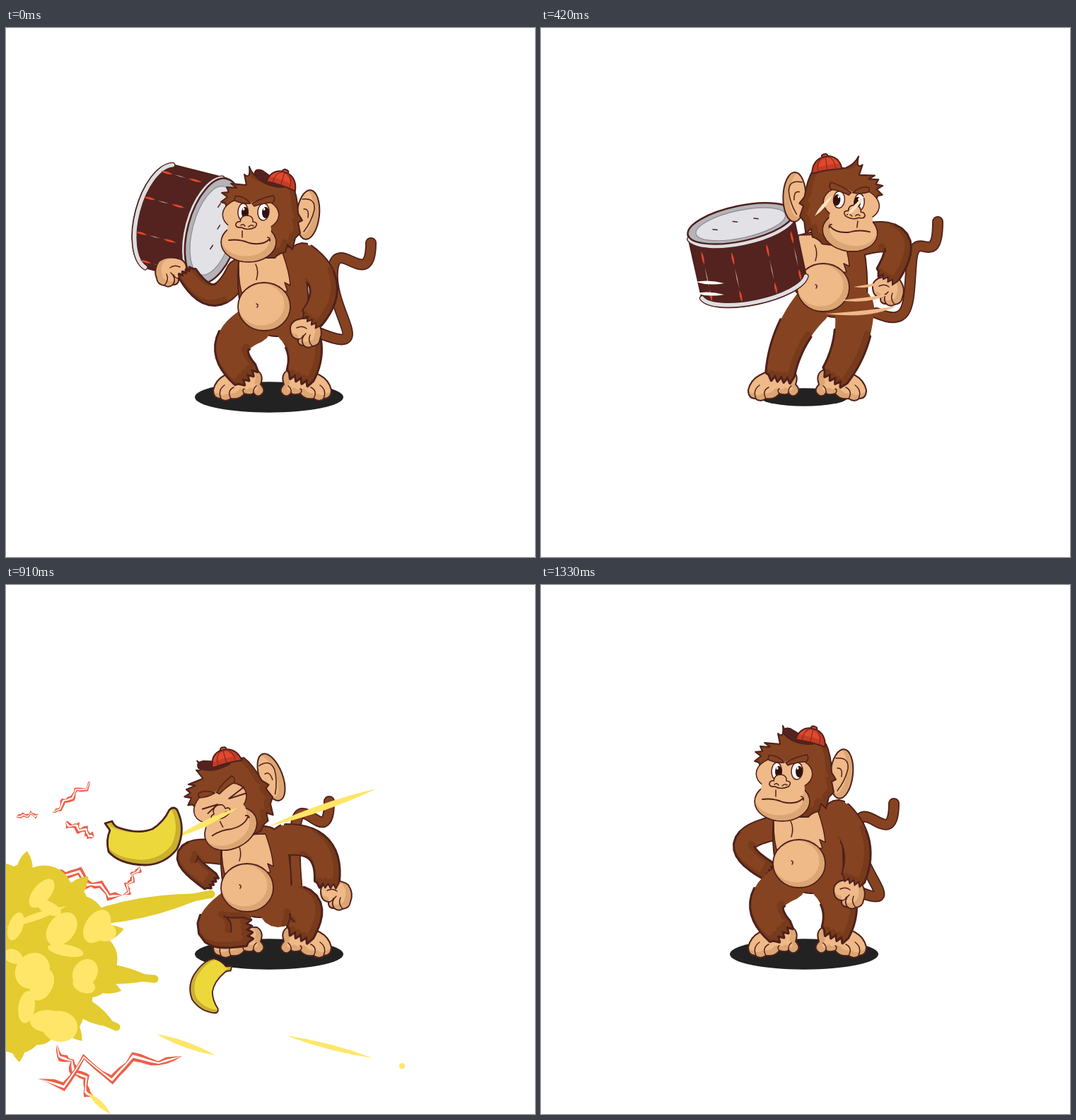
An HTML page with a canvas for the animation above (1.4 s loop, 748 px wide and 748 px high).

```html
<!DOCTYPE html>
<html lang="en">
<head>
<meta charset="utf-8">
<title>Monkey with drum</title>
<style>
html, body { margin: 0; width: 100%; height: 100%; overflow: hidden; background: #fff; }
canvas { display: block; width: 100vw; height: 100vh; }
</style>
</head>
<body>
<canvas id="stage" width="748" height="748"></canvas>
<script>
const ctx = document.getElementById('stage').getContext('2d');
const LINE = '#4f211c', FUR = '#854321', FUR_DARK = '#773a1b', SKIN = '#efb988', SKIN_DARK = '#dca574',
  WOOD = '#54231f', RED = '#e0492d', YELLOW = '#e3cb30', LIGHT = '#ffe668', BOLT = '#ec6047';
const RAD = Math.PI / 180, BURST = [10, 525];

// A pose names only what leads the motion; joints follow from it.
const carry = {
  belly: [365, 394], head: [342, 303, 0], hat: 29, handR: [424, 432], handL: [233, 346], palm: 1,
  waist: [462, 343], tip: [516, 304], loop: 85, drum: [253, 276, 105], face: 36, shadow: 105, lift: 0
};
const crouch = {
  ...carry, belly: [350, 420], head: [331, 327, 0], hat: 18, handR: [404, 411], handL: [390, 440], palm: 0,
  waist: [487, 385], tip: [560, 349], drum: [310, 327, 167], face: 17, shadow: 110
};
const turn = {
  ...crouch, belly: [399, 367], head: [438, 288, 7], hat: 20, handR: [491, 373], handL: [440, 390],
  waist: [524, 330], tip: [561, 274], loop: 50, drum: [292, 323, 348], face: 25, shadow: 62
};
const spin = { ...turn, lift: 25, shadow: 80 };
const flinch = {
  ...carry, belly: [341, 428], head: [317, 345, -27], hat: -4, handR: [467, 440], handL: [300, 440], palm: 0,
  waist: [410, 340], tip: [457, 306], loop: 0
};
const land = { ...flinch, drum: [143, 318, 435] };
const grab = {
  ...carry, belly: [352, 382], head: [348, 290, 3], hat: 34, handR: [369, 432], handL: [289, 419],
  waist: [437, 350], tip: [499, 321], loop: 70
};
const rest = { ...carry, head: [340, 306, 0], hat: 25, handR: [436, 438], handL: [330, 425], palm: 0, waist: [447, 345], tip: [499, 309] };
const track = [[0, carry], [280, crouch], [420, turn], [490, spin], [700, land], [910, flinch], [1050, grab], [1330, rest]];

function mix(a, b, k) {
  if (typeof a === 'number') return a + (b - a) * k;
  if (Array.isArray(a)) return a.map((v, i) => mix(v, b[i], k));
  return Object.fromEntries(Object.keys(a).map(key => [key, mix(a[key], b[key], k)]));
}

function poseAt(t) {
  const i = track.findLastIndex(key => key[0] <= t);
  const [t0, a] = track[i], [t1, b] = track[Math.min(i + 1, track.length - 1)];
  return mix(a, b, t1 > t0 ? (t - t0) / (t1 - t0) : 0);
}

const add = ([x, y], dx, dy) => [x + dx, y + dy];
const random = seed => { const v = Math.sin(seed * 127.1 + 3.7) * 43758.5; return v - Math.floor(v); };
const repeat = (n, draw) => { for (let i = 0; i < n; i++) draw(i, random(i * 3 + n), random(i * 3 + n + 1), random(i * 3 + n + 2)); };

function placed(x, y, deg, sx, sy, draw) {
  ctx.save();
  ctx.translate(x, y);
  ctx.rotate(deg * RAD);
  ctx.scale(sx, sy);
  draw();
  ctx.restore();
}

function trace(path, width = 1.5, color = LINE) {
  ctx.strokeStyle = color;
  ctx.lineWidth = width;
  ctx.stroke(typeof path === 'string' ? new Path2D(path) : path);
}

function paint(path, fill, shade, width = 2, line = LINE, edge = path) {
  ctx.fillStyle = fill;
  ctx.fill(path);
  if (shade) {
    ctx.save();
    ctx.clip(path);
    ctx.translate(-4, -3);
    trace(edge, 9, shade);
    ctx.restore();
  }
  if (width) trace(edge, width, line);
}

const shape = (d, ...style) => paint(new Path2D(d), ...style);

function oval(x, y, rx, ry = rx, deg = 0) {
  const path = new Path2D();
  path.ellipse(x, y, rx, ry, deg * RAD, 0, 7);
  return path;
}

const dot = (color, ...geometry) => paint(oval(...geometry), color, null, 0);

// Pointed sliver between two points, bent through a control point.
function streak(color, w, x0, y0, x1, y1, cx = (x0 + x1) / 2, cy = (y0 + y1) / 2) {
  const n = Math.hypot(x1 - x0, y1 - y0), ox = (y0 - y1) / n * w, oy = (x1 - x0) / n * w;
  shape(`M${x0},${y0}Q${cx + ox},${cy + oy} ${x1},${y1}Q${cx - ox},${cy - oy} ${x0},${y0}Z`, color, null, 0);
}

function polygon(points) {
  const path = new Path2D();
  points.forEach(p => path.lineTo(...p));
  return path;
}

// Tapered limb whose middle bends by the slack in its length, with a ragged cuff.
function limb([x0, y0], [x1, y1], reach, bend, r0, r1) {
  const dx = x1 - x0, dy = y1 - y0, d = Math.hypot(dx, dy);
  const bulge = 2 * bend * Math.sqrt(Math.max(64, reach * reach - d * d / 4)) / d;
  const cx = (x0 + x1) / 2 - dy * bulge, cy = (y0 + y1) / 2 + dx * bulge;
  const left = [], right = [], cuff = [], root = [];
  let tx, ty;
  for (let i = 0; i <= 14; i++) {
    const u = i / 14, v = 1 - u, r = r0 + (r1 - r0) * u;
    const x = v * v * x0 + 2 * u * v * cx + u * u * x1, y = v * v * y0 + 2 * u * v * cy + u * u * y1;
    tx = v * (cx - x0) + u * (x1 - cx);
    ty = v * (cy - y0) + u * (y1 - cy);
    const n = Math.hypot(tx, ty) || 1;
    tx /= n; ty /= n;
    left.push([x + ty * r, y - tx * r]);
    right.unshift([x - ty * r, y + tx * r]);
    if (!i) for (let a = 20; a < 180; a += 20) {
      const c = r * Math.cos(a * RAD), s = r * Math.sin(a * RAD);
      root.push([x - ty * c - tx * s, y + tx * c - ty * s]);
    }
  }
  for (let i = 1; i < 9; i++) {
    const d = i % 2 ? r1 * .5 : r1 * .12;
    cuff.push(add(mix(left.at(-1), right[0], i / 9), tx * d, ty * d));
  }
  return {
    full: polygon([...left, ...cuff, ...right, ...root]),
    sides: polygon([...left.slice(5), ...cuff, ...right.slice(0, -5)])
  };
}

const paintLimb = l => paint(l.full, FUR, FUR_DARK, 2, LINE, l.sides);

function tail([x, y], [wx, wy], [tx, ty], loop) {
  const path = new Path2D(`M${x},${y}C${x + loop},${y + loop * .42} ${wx - 5},${wy + 60} ${wx},${wy}C${wx + 5},${wy - 52} ${tx},${ty + 72} ${tx},${ty}`);
  trace(path, 16);
  trace(path, 12.5, FUR);
}

function drum([x, y, deg], ry) {
  const rx = 76, top = ry * .575 - 62, low = -top;
  const rim = yy => `M${1 - rx},${yy}A${rx},${ry} 0 0 0 ${rx - 1},${yy}`;
  placed(x, y, deg, 1, 1, () => {
    shape(`${rim(low)}V${top}H${-rx}Z`, WOOD, null, 3);
    for (const yy of [low - 3, top + 7]) {
      trace(rim(yy), 8);
      trace(rim(yy), 5.5, '#dedee2');
    }
    for (let a = 28; a < 160; a += 39) {
      const px = rx * Math.cos(a * RAD), py = ry * Math.sin(a * RAD);
      streak(RED, 3, px, py + top + 13, px, py + top + 32);
      streak(RED, 3, px, py + low - 10, px, py + low - 27);
      streak('#d8c6bf', 1, px, py + top + 36, px, py + low - 30);
    }
    paint(oval(0, top, rx, ry), '#b4b4b8', null, 2.5);
    paint(oval(0, top + 1, rx * .85, ry * .78), '#e1e1e6', null, 1.2, '#8d8a90');
    repeat(3, (i, a, b) => trace(`M${30 * i - 40},${top + ry * (b - .5)}l6,2`));
  });
}

function foot(x, y, sx, sy = 1, deg = 0) {
  placed(x, y, deg, sx, sy, () => {
    shape('M-20,-17Q-33,-10 -36,4Q-36,16 -26,16Q-19,22 -11,16Q1,18 8,9Q18,12 21,8Q28,17 35,7Q37,2 31,-4Q36,-18 26,-24L-4,-25Z', SKIN, SKIN_DARK);
    trace('M-25,16Q-30,4 -20,-3M-11,16Q-17,5 -7,0M8,9Q4,4 8,2M21,8Q20,2 25,-2');
  });
}

function hand([x, y], size, flip) {
  if (size < .35) return;
  placed(x, y, 0, flip * size, size, () => {
    shape('M-14,-19Q5,-25 17,-16Q25,-4 20,8Q19,17 9,18Q3,22 -3,17Q-12,17 -11,8Q-22,7 -22,-7Q-22,-15 -14,-19Z', SKIN, SKIN_DARK);
    trace('M9,18Q2,10 6,2M-3,17Q-9,8 0,0M-11,8Q-6,8 -4,3M-13,-8Q-5,-12 1,-7');
  });
}

function cap(x, y, deg, flip, brim) {
  placed(x, y, deg, flip, 1, () => {
    if (brim) shape('M4,9Q-24,16 -40,3Q-42,-6 -31,-5Q-21,-2 -14,1Z', WOOD);
    shape('M-21,8Q-19,-12 0,-13Q19,-11 22,9Q2,6 -21,8Z', RED, '#c63c25');
    shape('M-4,-12Q-3,-17 1,-16Q6,-16 5,-12Z', RED);
    trace('M0,-12V6M-3,-12Q-13,-7 -12,6M5,-12Q14,-5 13,6', 1.1, '#7b2a1f');
  });
}

function head([x, y, deg], tilt, flip, shut) {
  placed(x, y, deg, flip, 1, () => {
    ctx.translate(-342, -303);
    paint(oval(427, 264, 16, 35, 6), SKIN, SKIN_DARK);
    trace('M419,242Q438,240 436,257Q432,274 421,288M421,256Q429,255 427,268');
    shape('M310,248L304,246L313,239L305,233L315,232L312,225L326,226L318,220L340,222L337,207Q346,215 344,196Q348,208 361,215Q384,215 405,222Q412,236 413,262L419,272L413,275L416,290L409,297L405,313L398,306L395,317Q386,318 380,325L340,325Z', FUR, FUR_DARK);
    const eyes = oval(346, 264, 39, 24), muzzle = oval(343, 303, 38, 27);
    trace(eyes, 3);
    trace(muzzle, 3.5);
    paint(eyes, SKIN, null, 0);
    paint(muzzle, SKIN, SKIN_DARK, 0);
    dot(SKIN, 344, 285, 31, 23);
    shape('M308,252Q320,234 347,247Q370,236 386,256L392,246L374,229L326,229Z', FUR, null, 0);
    if (shut) trace('M320,260L342,264L324,269M386,259L360,264L384,268', 2);
    else for (const r of [7, 8]) {
      const ex = 29 * r + 132;
      paint(oval(ex, 260, r, 12, 4), '#fff', null, 1.5);
      dot('#32120f', ex + 3, 261, 5, 8);
      dot('#fff', ex + 1, 256, 1.5, 2);
    }
    shape('M324,238Q335,236 346,248Q334,249 323,244Z', FUR, null, 1.5);
    shape('M348,248Q362,240 378,237Q382,242 377,247Q365,247 351,252Z', FUR, null, 1.5);
    shape('M331,274Q332,265 341,265Q350,266 349,274Q358,275 352,282Q341,287 333,282Q324,283 325,277Q327,273 331,274Z', SKIN, null, 1.6);
    trace('M332,279q3,-3 6,1M343,281q4,-4 7,-1M334,287v9');
    trace('M315,300Q330,298 344,304Q363,308 372,299M370,296q4,1 3,5', 1.8);
  });
  const a = tilt * RAD;
  cap(x + flip * 100 * Math.sin(a), y - 100 * Math.cos(a), flip * (tilt - 12), flip, flip > 0);
}

function frontMonkey(p, t) {
  const flip = t >= 350 && t < 700 ? -1 : 1;
  const { belly, handL, handR } = p, [bx, by] = belly;
  const [cx, cy] = add(belly, 10, -48), [hx, hy] = add(belly, 17, 16);
  const wrist = (at, side) => {
    const dx = cx + side * 80 - at[0], dy = cy + 5 - at[1], n = Math.hypot(dx, dy);
    return add(at, dx / n * 24, dy / n * 24);
  };
  const armL = limb([cx - 46, cy - 2], wrist(handL, -1), 48, handL[1] < cy + 10 ? -1 : 1, 16, 13);
  const armR = limb([cx + 45, cy - 20], wrist(handR, 1), 48, -1, 21, 17);
  const legs = [limb(add(belly, -16, 26), [338, 490], 43, 1, 27, 20), limb(add(belly, 44, 28), [416, 491], 36, -1, 28, 20)];
  const torso = new Path2D(`M${cx - 44},${cy - 25}Q${cx - 50},${cy + 20} ${hx - 46},${hy}Q${hx},${hy + 48} ${hx + 44},${hy + 4}Q${cx + 53},${cy + 25} ${cx + 46},${cy - 10}Q${cx + 35},${cy - 40} ${cx + 8},${cy - 38}Z`);

  tail(add(belly, 75, 36), p.waist, p.tip, p.loop);
  if (flip > 0 && t < 840) drum(p.drum, p.face);
  hand(handL, p.palm, -1);
  trace(armL.full, 4);
  paintLimb(armL);
  foot(329, 508, 1);
  foot(424, 508, -1);
  for (const path of [legs[0].sides, legs[1].sides, torso, armR.full]) trace(path, 4);
  legs.forEach(paintLimb);
  paint(torso, FUR, null, 0);
  shape(`M${cx - 45},${cy - 26}Q${cx - 48},${cy + 5} ${cx - 42},${cy + 28}L${bx + 33},${by - 22}l-4,-12l8,4Q${cx + 26},${cy} ${cx + 16},${cy - 28}Z`, SKIN, null, 1.5);
  trace(`M${cx - 22},${cy - 12}q5,10 1,22`);
  paint(oval(bx, by, 37, 34), SKIN, SKIN_DARK, 1.8);
  trace(`M${bx - 11},${by - 4}q4,1 1,5`);
  if (flip < 0) drum(p.drum, p.face);
  hand(handR, 1, 1);
  paintLimb(armR);
  head(p.head, p.hat, flip, t >= 840 && t < 1050);
}

function backMonkey() {
  drum([307, 257, 0], 41);
  foot(331, 436, -.82, .72);
  foot(405, 455, .82, .85);
  const legs = [limb([366, 352], [320, 415], 50, 1, 23, 21), limb([412, 345], [408, 433], 44, -1, 25, 19)];
  legs.forEach(l => { trace(l.full, 4); paintLimb(l); });
  shape('M350,260Q348,290 333,315Q326,345 352,352Q402,372 434,350Q441,300 440,258Z', FUR, FUR_DARK);
  hand([235, 268], 1, -1);
  paintLimb(limb([358, 281], [252, 272], 54, -1, 21, 14));
  shape('M348,262L348,288Q340,310 335,322L395,340L420,255Z', FUR, null, 0);
  paint(oval(450, 232, 10, 23, 8), SKIN, SKIN_DARK);
  shape('M345,230L350,202L354,180L362,178L357,164L367,168Q365,155 373,149Q372,160 381,165L392,157Q385,167 401,169Q440,172 448,195Q452,235 440,256Q420,269 385,266Q355,262 345,246L352,237Z', FUR, FUR_DARK);
  paint(oval(339, 204, 17, 32, 6), SKIN, SKIN_DARK);
  trace('M345,190Q330,203 339,220M363,262Q390,268 414,264');
  cap(420, 170, 6, 1, false);
  const curl = 'M388,342C375,410 305,415 273,370Q253,338 227,337';
  trace(curl, 16);
  trace(curl, 12.5, FUR);
  repeat(7, (i, a, b) => {
    const x = i % 2 ? 390 + 22 * a : 300 + 40 * a, y = 302 + i * 18;
    streak('#fff', 5, x, y, x + 18 + 28 * b, y - 3 - 10 * b);
  });
  repeat(6, (i, a) => {
    const y = 179 + i * 15;
    streak(i % 3 ? FUR : WOOD, 2 + 3 * a, 440, y, 490 + 38 * a, y + 6 + i * 2, 470, y - 2);
  });
  streak(WOOD, 6, 453, 274, 509, 303, 507, 274);
  streak(FUR, 3, 519, 294, 474, 335, 523, 324);
  streak(SKIN, 6, 352, 440, 381, 411);
}

// Zigzag spark: seeded kinks along a line, thorny edge, thin pale core.
function bolt(x0, y0, x1, y1, w, kinks = 6) {
  const length = Math.hypot(x1 - x0, y1 - y0), nx = (y0 - y1) / length, ny = (x1 - x0) / length;
  const spine = [], count = kinks * 3;
  const kink = i => i % kinks ? (i % 2 ? 1 : -1) * (.3 + random(i + x0)) * length / kinks * .45 : 0;
  for (let i = 0; i <= count; i++) {
    const k = Math.floor(i / 3), side = mix(kink(k), kink(k + 1), i % 3 / 3);
    spine.push(add(mix([x0, y0], [x1, y1], i / count), nx * side, ny * side));
  }
  const ribbon = (width, color) => {
    const edge = (i, seed) => width * Math.min(1, i / 2, (count - i) / 2) * (.2 + .65 * random(i * 5 + seed + x0));
    const rail = (sign, seed) => spine.map(([x, y], i) => add([x, y], sign * nx * edge(i, seed), sign * ny * edge(i, seed)));
    paint(polygon([...rail(1, 0), ...rail(-1, 2).reverse()]), color, null, 0);
  };
  ribbon(w, BOLT);
  ribbon(w * .32, '#fff');
}

function blastBolts() {
  bolt(65, 322, 119, 277, 6);
  bolt(14, 327, 46, 324, 5);
  bolt(84, 335, 125, 356, 9);
  bolt(68, 400, 165, 439, 9);
  bolt(165, 439, 190, 397, 6);
  bolt(72, 650, 125, 726, 10);
  bolt(45, 698, 249, 666, 9);
}

function bodyBolts(w) {
  bolt(395, 325, 398, 520, w * 1.2);
  bolt(398, 520, 365, 655, w);
  bolt(365, 655, 468, 709, w, 4);
  bolt(468, 709, 355, 724, w * .7);
  bolt(392, 500, 440, 440, w, 3);
  bolt(430, 448, 584, 342, w);
  bolt(304, 462, 348, 532, w * .8, 4);
  bolt(311, 532, 266, 737, w * .9, 7);
  bolt(440, 565, 542, 536, w * .6);
  bolt(522, 546, 507, 607, w * .6, 4);
  bolt(250, 382, 333, 347, w * .7);
  bolt(337, 573, 398, 572, w * .25);
}

function blast(size) {
  placed(...BURST, 0, size, size, () => {
    dot(YELLOW, 0, 0, 118);
    repeat(13, (i, a, b, c) => {
      const angle = (i * 17 - 100) * RAD, x = 108 * Math.cos(angle), y = 100 * Math.sin(angle);
      dot(YELLOW, x, y, 24 + 17 * a, 24 + 14 * b);
      if (i % 2) streak(YELLOW, 22, x, y, x * 1.5, y * 1.5);
    });
    for (const [x, y] of [[280, -88], [200, 32], [146, 100]]) {
      streak(YELLOW, 28, 60, y * .5, x, y);
      trace(`M90,${y * .62}Q${x * .6},${y * .75} ${x},${y}`, 11, YELLOW);
    }
    repeat(15, (i, a, b, c) => {
      const angle = i * 137 * RAD, r = 30 * Math.sqrt(i);
      dot(LIGHT, Math.abs(r * Math.cos(angle)) * 1.25, r * Math.sin(angle), 10 + 17 * a, 8 + 20 * b, 40 * c);
    });
    streak(LIGHT, 10, -10, -41, 76, -71);
  });
}

function sparks(spread) {
  placed(20 * (1 - spread), 500 * (1 - spread), 0, spread, spread, () => {
    streak(LIGHT, 8, 238, 358, 328, 315);
    streak(LIGHT, 9, 372, 341, 524, 288);
    streak(LIGHT, 8, 213, 635, 296, 665);
    streak(LIGHT, 7, 396, 637, 519, 669);
    streak(LIGHT, 8, 116, 718, 148, 748);
    dot(LIGHT, 560, 680, 4);
  });
}

function drops(spread, size) {
  repeat(20, (i, a, b, c) => {
    const x = 265 * a, y = 215 - 420 * b * b, r = (3 + 5 * c) * size;
    dot(YELLOW, BURST[0] + x * spread, BURST[1] + y * spread, r, r * (.6 + .6 * a), 90 * b);
  });
  placed(0, 540 + 160 * spread, 0, size, size, () => {
    shape('M0,0Q42,5 59,-16Q64,-4 53,7Q32,29 0,22Z', YELLOW, null, 0);
    dot(YELLOW, 136, -28, 20, 10);
  });
}

function banana(x, y, deg, size) {
  placed(x, y, deg, size, size, () => {
    shape('M-55,-18L-45,-21Q-42,-14 -36,-12Q-8,-2 12,-10Q28,-20 36,-37Q42,-43 47,-37Q60,-10 47,18Q30,40 2,41Q-35,40 -50,22Q-54,5 -48,-8Z', '#ecd83b', '#c9b02f', 2.8);
  });
}

function speedLines(t) {
  if (t === 280) {
    streak(WOOD, 4, 180, 311, 216, 350, 190, 333);
    streak(WOOD, 6, 187, 335, 242, 382, 200, 370);
  }
  if (t === 420) {
    for (const y of [359, 375]) streak('#fff', 5, 218, y, 259, y + 2);
    for (const x of [387, 433]) streak('#ffe3c4', 5, x, 266, x + 25, 237);
    for (let i = 0; i < 3; i++) streak(SKIN, 4 + i, 442 - 20 * i, 366 + 19 * i, 485 + 9 * i, 359 + 17 * i, 465, 366 + 20 * i);
  }
}

function explosion(t) {
  const k = (t - 910) / 140;
  if (t < 840 || t > 1190) return;
  if (t <= 910) {
    blastBolts();
    blast(1 + k * .36);
    sparks(1 + k * .36);
  } else {
    drops(.6 + .4 * k, Math.min(1, 1.8 - .8 * k));
    if (t === 980) { blast(.5); sparks(1.4); }
    if (t <= 1120) bodyBolts(t === 1050 ? 17 : 10);
  }
  const near = Math.min(k, 1);
  if (t <= 1120) banana(...mix([195, 355, 0, 1], [317, 408, -51, 1], near));
  banana(...mix([290, 565, 120, .68], [526, 768, 82, .7], k));
}

function render(t) {
  ctx.setTransform(1, 0, 0, 1, 0, 0);
  ctx.clearRect(0, 0, 748, 748);
  ctx.lineJoin = ctx.lineCap = 'round';
  const pose = poseAt(t), back = t === 560 || t === 630;
  const reach = back ? 101 : pose.shadow;
  dot('#222', 372, 522, reach, reach * .207);
  placed(0, back ? (t - 630) / 8 : -pose.lift, 0, 1, 1, () => back ? backMonkey() : frontMonkey(pose, t));
  speedLines(t);
  explosion(t);
}

const start = performance.now();
function tick() {
  const t = (performance.now() - start) % 1400;
  const held = t < 140 ? 0 : t >= 700 && t < 840 ? 700 : Math.floor(t / 70) * 70;
  render(held);
  requestAnimationFrame(tick);
}
tick();
</script>
</body>
</html>
```
